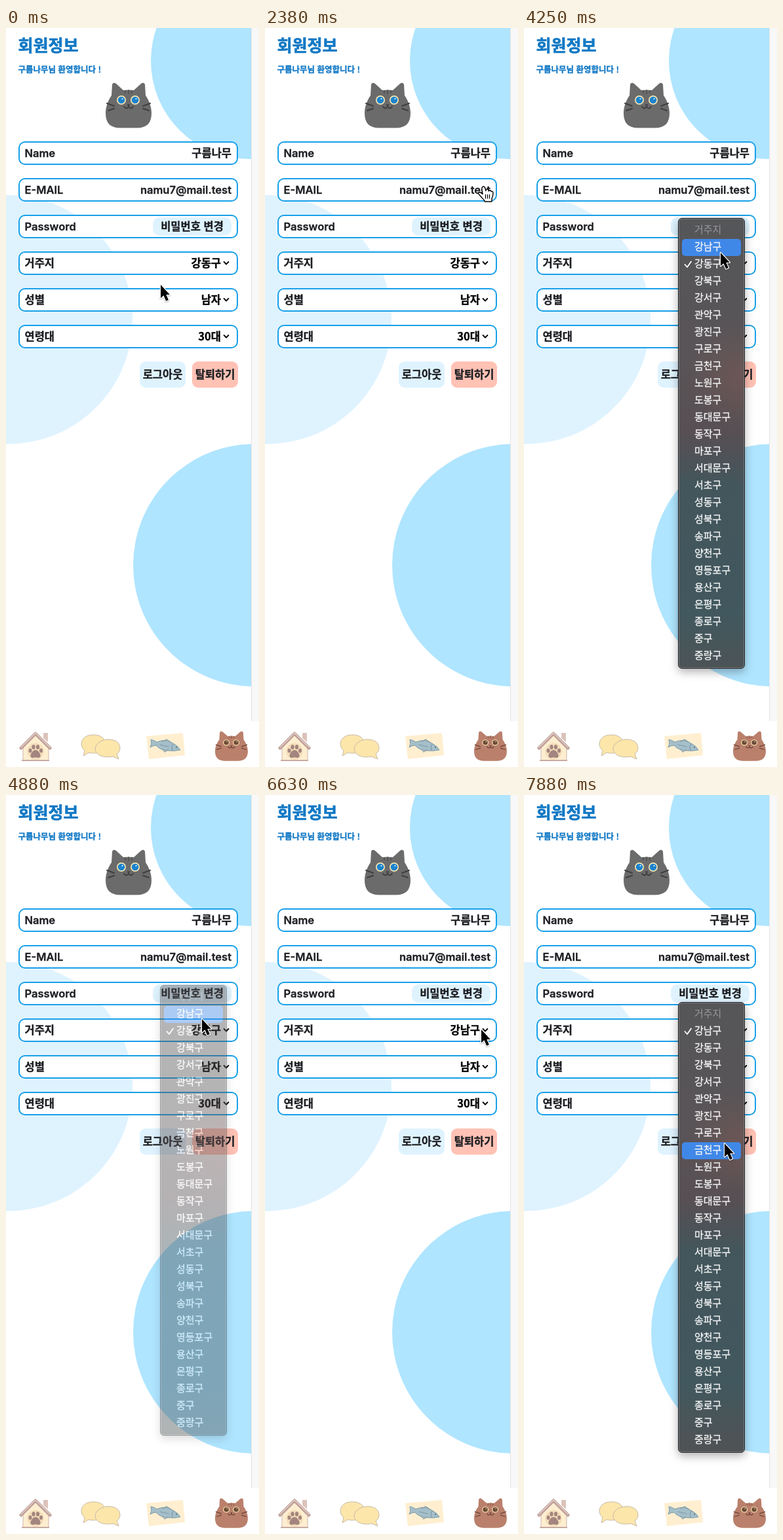
Animation, 386 px wide and 1128 px high, one loop 8 s. Source, as an HTML page:

```html
<!DOCTYPE html>
<html lang="ko">
<head>
<meta charset="utf-8">
<title>회원정보</title>
<style>
  html, body { margin: 0; width: 100%; height: 100%; overflow: hidden; background: #fff; }
  svg { display: block; width: 386px; height: 1128px; }
  text { font: 700 16.5px "Noto Sans CJK KR", "Noto Sans CJK", sans-serif; fill: #1c1e22; stroke: #1c1e22; stroke-width: .3; }
  .latin { font-family: Inter, "Noto Sans CJK KR", sans-serif; font-weight: 600; }
  .value { fill: #000; stroke: #000; }
  .blue { fill: #1279c5; stroke: #1279c5; }
  .title { font-size: 25px; stroke-width: .7; }
  .hello { font-size: 12.5px; }
  .field { fill: #fff; stroke: #18a0e9; stroke-width: 2; }
  .menu { filter: drop-shadow(0 5px 7px rgba(0, 0, 0, .3)); }
  .menu text { font-size: 15px; font-weight: 400; fill: #f4f4f5; stroke: #f4f4f5; }
  .menu .off { fill: #98989b; stroke: none; }
  .line { fill: none; stroke-linecap: round; stroke-linejoin: round; }
  #arrow { filter: drop-shadow(0 1px 1px rgba(0, 0, 0, .3)); }
</style>
</head>
<body>
<svg id="stage" viewBox="0 0 386 1128"></svg>
<script>
const LOOP = 8000, STEP = 125, ROW = 26;
const districts = ('거주지 강남구 강동구 강북구 강서구 관악구 광진구 구로구 금천구 노원구 도봉구 동대문구 동작구 ' +
  '마포구 서대문구 서초구 성동구 성북구 송파구 양천구 영등포구 용산구 은평구 종로구 중구 중랑구').split(' ');

// Pointer path: time, x, y of the hot spot
const path = [
  [0, 236, 392], [500, 238, 388], [1500, 322, 200], [2000, 333, 240], [2375, 334, 242],
  [2875, 318, 356], [3500, 317, 357], [4250, 300, 343], [4875, 299, 342], [5500, 287, 774],
  [5750, 287, 779], [6000, 287, 779], [6625, 330, 358], [7000, 330, 358], [7875, 306, 532]
];
const menus = [
  { top: 290, checked: 2, open: 3000, fade: 4875, close: 5000 },
  { top: 316, checked: 1, open: 6750, fade: LOOP, close: LOOP }
];

const text = (x, y, s, cls = '', more = '') => `<text x="${x}" y="${y}" class="${cls}" ${more}>${s}</text>`;
const end = 'text-anchor="end"', mid = 'text-anchor="middle"';
const box = (x, y, w, h, r, fill) => `<rect x="${x}" y="${y}" width="${w}" height="${h}" rx="${r}" fill="${fill}"/>`;
const chevron = y => `<path class="line" d="M332.6 ${y - 2}l3.4 3.5 3.4-3.5" stroke="#000" stroke-width="1.8"/>`;

function cat(place, fur, dark, iris) {
  const eye = x => `<circle cx="${x}" cy="27" r="7" fill="#f7e6b2"/><circle cx="${x}" cy="27" r="5.3" fill="${iris}"/>
    <circle cx="${x + 1.5}" cy="25" r="1" fill="#fff"/>`;
  return `<g transform="${place}">
    <path d="M9 20L10 3Q12-1 16 2L27 12Q35 11 43 12L54 2Q58-1 60 3L61 20C66 27 70 37 70 47C70 62 63 69.5 48 69.5H22C7 69.5 0 62 0 47C0 37 4 27 9 20Z" fill="${fur}"/>
    <path class="line" d="M30 13v3M35 12v5M40 13v3" stroke="${dark}" stroke-width="2" opacity=".5"/>
    <path class="line" d="M2 32l11 4M4 43l9-3M68 32l-11 4M66 43l-9-3M28 37q3.5 5 7 0q3.5 5 7 0" stroke="${dark}" stroke-width="2"/>
    <path d="M32.5 33.5h5L35 37z" fill="${dark}"/>${eye(24)}${eye(45)}</g>`;
}

function background() {
  return `<g clip-path="url(#page)">
    <circle cx="371" cy="50" r="150" fill="#afe5ff"/>
    <circle cx="3" cy="445" r="190" fill="#dff3ff"/>
    <circle cx="379" cy="820" r="185" fill="#afe5ff"/></g>
    ${box(375, 0, 11, 1058, 0, '#f8f8f8')}${box(374, 0, 1, 1058, 0, '#e3e3e3')}`;
}

function form() {
  const labels = ['Name', 'E-MAIL', 'Password', '거주지', '성별', '연령대'];
  const rows = labels.map((s, i) => `<rect class="field" x="20" y="${174 + 56 * i}" width="333" height="34" rx="9"/>` +
    text(28.5, (i < 3 ? 197 : 196.5) + 56 * i, s, i < 3 ? 'latin' : '')).join('');
  return text(18.5, 35.5, '회원정보', 'blue title') +
    text(18.5, 67.5, '구름나무님 환영합니다 !', 'blue hello') +
    cat('translate(152 83)', '#6b6b6b', '#3f3f41', '#1b84cf') + rows +
    text(344, 196.5, '구름나무', '', end) + text(344, 253, 'namu7@mail.test', 'latin', end) +
    box(224, 289, 120, 28, 10, '#dff3ff') + text(284, 308.5, '비밀번호 변경', '', mid) +
    `<rect id="ring" x="244" y="344" width="100" height="30" rx="9" fill="#fff" stroke="#1463b2" stroke-width="2"/>` +
    text(328, 364.5, '강동구', 'value', end + ' id="before"') + text(328, 364.5, '강남구', 'value', end + ' id="after"') +
    text(328, 420.5, '남자', 'value', end) + text(328, 476.5, '30대', 'value', end) +
    [359, 415, 471].map(chevron).join('') +
    box(204, 509, 70, 40, 9, '#dff3ff') + text(239, 534.5, '로그아웃', '', mid) +
    box(284, 509, 70, 40, 9, '#ffc2b5') + text(319, 534.5, '탈퇴하기', '', mid);
}

function tabs() {
  const house = `<path d="M26 1097L45 1079l20 18v21H26z" fill="#fdeed0" stroke="#cdb5ad"/>
    <path d="M57 1076h7v14l-7-6z" fill="#dcc3ba"/>
    <path class="line" d="M23 1099l22-22 22 22" stroke="#bfa09a" stroke-width="5"/>
    <path class="line" d="M23 1098l22-22 22 22" stroke="#e3cfc6" stroke-width="1.5"/>
    <path d="M24 1117h42v2H24z" fill="#c7aaa2"/>
    <circle cx="45" cy="1104" r="12.5" fill="#f3dcb8"/>
    <g fill="#a3857f"><path d="M45 1102q4 0 7 6 2 6-3 6-4-1.5-8 0-5 0-3-6 3-6 7-6z"/>
    <ellipse cx="37" cy="1103" rx="2.5" ry="3.3"/><ellipse cx="42" cy="1097.5" rx="2.6" ry="3.6"/>
    <ellipse cx="48.5" cy="1097.5" rx="2.6" ry="3.6"/><ellipse cx="53.5" cy="1103" rx="2.5" ry="3.3"/></g>`;
  const chat = `<g fill="#fde6aa" stroke="#c5b9a8" stroke-width="1">
    <path d="M132 1079c11-1 20 5 20 14s-9 14-19 14q-4 0-7-1l-8 5 2-8c-3-3-5-6-5-10 0-8 7-14 17-14z"/>
    <path d="M154 1086c11-1 20 4 20 13 0 4-2 7-5 9l3 8-9-4c-14 3-26-2-27-11 0-8 8-14 18-15z"/></g>`;
  const fish = `<path d="M214 1081l56-5 3 34-55 6z" fill="#ffefd0"/>
    <path d="M221 1086q5 1 9 4 14-6 25 2 8 4 11 10-9 2-18 1-12 0-19-8-5 0-9 3 3-5 1-12z" fill="#a5bfca" stroke="#7e99a8"/>
    <path class="line" d="M239 1089l6-3 6 4M239 1101l3 4 5-3M255 1093q-3 4-1 9M235 1094l13 3" stroke="#7e99a8" stroke-width="1.2"/>
    <circle cx="260" cy="1098" r="1" fill="#51636d"/>`;
  return house + chat + fish + cat('translate(319 1073) scale(.714 .657)', '#ba806c', '#6d4337', '#6d4a35');
}

function menu({ top, checked }, i) {
  const mark = top + 18 + ROW * checked;
  const frame = (inset, stroke, fill) => `<rect x="${235 + inset}" y="${top + inset}" width="${102 - 2 * inset}"
    height="${688 - 2 * inset}" rx="${6 - inset}" fill="${fill}" stroke="${stroke}"/>`;
  return `<g class="menu" id="menu${i}">${frame(.5, '#202123', 'url(#glass)')}${frame(1.5, '#797b7e', 'url(#glow)')}
    <rect id="pick${i}" x="241" y="${top + 6}" width="90" height="${ROW}" rx="5" fill="#4088e8"/>
    <path class="line" d="M245.5 ${mark + 1}l3.5 4 6-8.5" stroke="#fff" stroke-width="1.8"/>
    ${districts.map((s, n) => text(260, top + 23.3 + ROW * n, s, n ? '' : 'off')).join('')}</g>`;
}

const pointers = `<path id="arrow" d="M0 0V20.3L4.5 16.3 8.2 24.7 11.9 23.1 8.3 14.9H13.9Z"
    stroke="#fff" stroke-width="2.4" stroke-linejoin="round" paint-order="stroke"/>
  <g id="hand" stroke="#000" stroke-width="1.4" stroke-linejoin="round">
    <path fill="#fff" d="M-2.8 1.6C-2-.6.8-.4 1.6 1.8L3 6.5C3 3.6 6.4 3.4 6.9 5.6L7.3 7C8 5 10.8 5.4 11 7.6
      12.5 6.6 14 7.6 14 9.6 14 13 13.6 15 12.2 18L11.8 23H1.5C1 20.5-2 18.5-4 16-6 13.5-8.5 11.5-8.6 10
      -8.5 8.2-5.6 8.4-4.2 9.8L-2 11.6-3.2 4Z"/>
    <path d="M2.5 12v6.5M5.5 12v6.5M8.5 12v6.5" stroke-width="1.2"/></g>`;

document.getElementById('stage').innerHTML = `<defs>
  <clipPath id="page"><rect width="374" height="1058"/></clipPath>
  <linearGradient id="glass" gradientUnits="userSpaceOnUse" x1="0" y1="290" x2="0" y2="1004">
    <stop offset="0" stop-color="#555659"/><stop offset=".32" stop-color="#595457"/>
    <stop offset=".46" stop-color="#574f53"/><stop offset=".57" stop-color="#43565c"/>
    <stop offset=".85" stop-color="#41585e"/><stop offset="1" stop-color="#505254"/></linearGradient>
  <radialGradient id="glow" gradientUnits="userSpaceOnUse" cx="330" cy="532" r="80">
    <stop offset="0" stop-color="#8a5a54" stop-opacity=".4"/><stop offset="1" stop-color="#8a5a54" stop-opacity="0"/>
  </radialGradient></defs>` + background() + form() + tabs() + menus.map(menu).join('') + pointers;

function pointerAt(t) {
  const n = path.findIndex(p => p[0] > t);
  if (n < 0) return path[path.length - 1].slice(1);
  const [t0, x0, y0] = path[n - 1], [t1, x1, y1] = path[n];
  const u = (t - t0) / (t1 - t0), e = u * u * (3 - 2 * u);
  return [x0 + (x1 - x0) * e, y0 + (y1 - y0) * e];
}

const move = (x, y) => `translate(${x}px, ${y}px)`;
const isOpen = (m, t) => t >= m.open && t < m.close;
const overField = t => {
  const [x, y] = pointerAt(t);
  return !menus.some(m => isOpen(m, t)) && x < 354 && y >= 173 && y < 321 && (y - 173) % 56 < 36;
};

// Samples a pose function once per step and holds each pose
function play(id, pose) {
  const count = LOOP / STEP;
  const keys = Array.from({ length: count + 1 }, (_, k) =>
    ({ ...pose(k % count * STEP), offset: k / count, easing: 'step-end' }));
  document.getElementById(id).animate(keys, { duration: LOOP, iterations: Infinity });
}

const show = on => ({ opacity: on ? 1 : 0 });
play('arrow', t => ({ ...show(!overField(t)), transform: move(...pointerAt(t)) }));
play('hand', t => ({ ...show(overField(t)), transform: move(...pointerAt(t)) }));
play('ring', t => show(t >= 5000 && t < 6000));
play('before', t => show(t < 5000));
play('after', t => show(t >= 5000));
menus.forEach((m, i) => {
  play('menu' + i, t => ({ opacity: isOpen(m, t) ? (t >= m.fade ? .44 : 1) : 0 }));
  play('pick' + i, t => {
    const row = Math.round((pointerAt(t)[1] - m.top - 18) / ROW);
    return { ...show(row > 0 && row < districts.length), transform: move(0, row * ROW) };
  });
});
</script>
</body>
</html>
```
